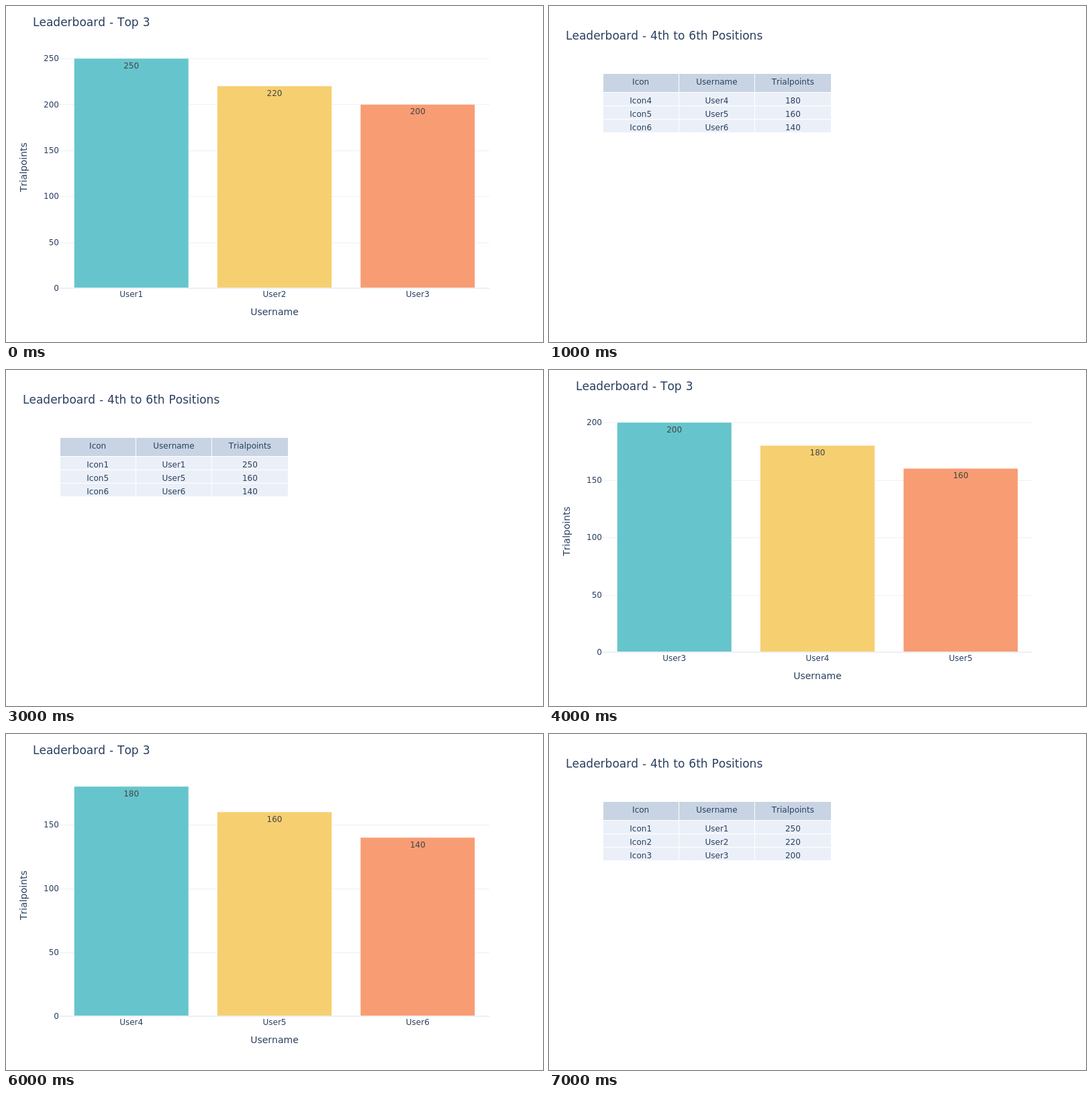
These frames come from a looping animation (800 by 500 pixels, 8 s). An HTML page:

```html
<!DOCTYPE html>
<html lang="en">
<head>
<meta charset="utf-8">
<title>Leaderboard</title>
<style>
  html, body { margin: 0; width: 100%; height: 100%; overflow: hidden; background: #fff; }
  svg { display: block; }
  text {
    font-family: Verdana, "DejaVu Sans", sans-serif;
    font-size: 12px;
    font-kerning: none;
    word-spacing: .034em;
    fill: #2a3f5f;
    text-anchor: middle;
  }
  .title { font-size: 17px; text-anchor: start; }
  .axis { font-size: 14px; }
  .tick { text-anchor: end; }
  .value { fill: #444; }
  .grid { stroke: #ebf0f8; stroke-width: 1; }
  .zero { stroke: #ebf0f8; stroke-width: 2; }
  .bar { stroke: #fff; stroke-width: .5; }
  .head { fill: #c8d4e3; }
  .cell { fill: #ebf0f8; }
  .scene { visibility: hidden; animation: show 8s step-end infinite; }
  @keyframes show {
    0% { visibility: visible; }
    12.5%, 100% { visibility: hidden; }
  }
</style>
</head>
<body>
<svg id="stage" width="800" height="500" viewBox="0 0 800 500"></svg>
<script>
const points = [250, 220, 200, 180, 160, 140];
const colors = ["rgb(102,197,204)", "rgb(246,207,113)", "rgb(248,156,116)"];
const base = 420, plotHeight = 342;

const text = (x, y, s, cls = "", extra = "") =>
  `<text x="${x}" y="${y}" class="${cls}" ${extra}>${s}</text>`;
const rect = (x, y, w, h, cls, extra = "") =>
  `<rect x="${x}" y="${y}" width="${w}" height="${h}" class="${cls}" ${extra}/>`;
const line = (y, cls) => `<path d="M80 ${y}H720" class="${cls}"/>`;

function chart(users) {
  const max = points[users[0] - 1];
  const yOf = v => base - plotHeight * v / max;
  let out = text(40, 30, "Leaderboard - Top 3", "title");
  for (let v = 0; v <= max; v += 50) {
    const y = yOf(v);
    if (v) out += line(Math.round(y) + .5, "grid");
    out += text(79, y + 4.2, v, "tick");
  }
  users.forEach((u, i) => {
    const v = points[u - 1], y = yOf(v), step = 640 / 3;
    const mid = 80 + step * (i + .5);
    out += rect(mid - step * .4, y, step * .8, base - y, "bar", `fill="${colors[i]}"`);
    out += text(mid, y + 15, v, "value") + text(mid, 433, "User" + u);
  });
  return out + line(base, "zero") + text(400, 460, "Username", "axis") +
    text(0, 0, "Trialpoints", "axis", 'transform="translate(31.3 240) rotate(-90)"');
}

function table(users) {
  const edges = [80, 193, 306, 420];
  const rows = [["Icon", "Username", "Trialpoints"],
    ...users.map(u => ["Icon" + u, "User" + u, points[u - 1]])];
  let out = text(25, 50, "Leaderboard - 4th to 6th Positions", "title");
  rows.forEach((row, r) => {
    const top = r ? 109 + 20 * r : 101;
    row.forEach((s, c) => {
      const x = edges[c] + 1;
      out += rect(x, top, edges[c + 1] - x, r ? 19 : 27, r ? "cell" : "head");
      out += text(80 + 340 / 3 * (c + .5), r ? 125 + 20 * r : 117, s);
    });
  });
  return out;
}

// Each round drops the leader from the chart and puts them in the table.
const scenes = [];
for (let k = 0; k < 4; k++) {
  const top = [1, 2, 3].map(n => n + k);
  scenes.push(chart(top), table([1, 2, 3, 4, 5, 6].filter(n => !top.includes(n))));
}
document.getElementById("stage").innerHTML = scenes.map((s, i) =>
  `<g class="scene" style="animation-delay:${i - scenes.length}s">${s}</g>`).join("");
</script>
</body>
</html>
```
